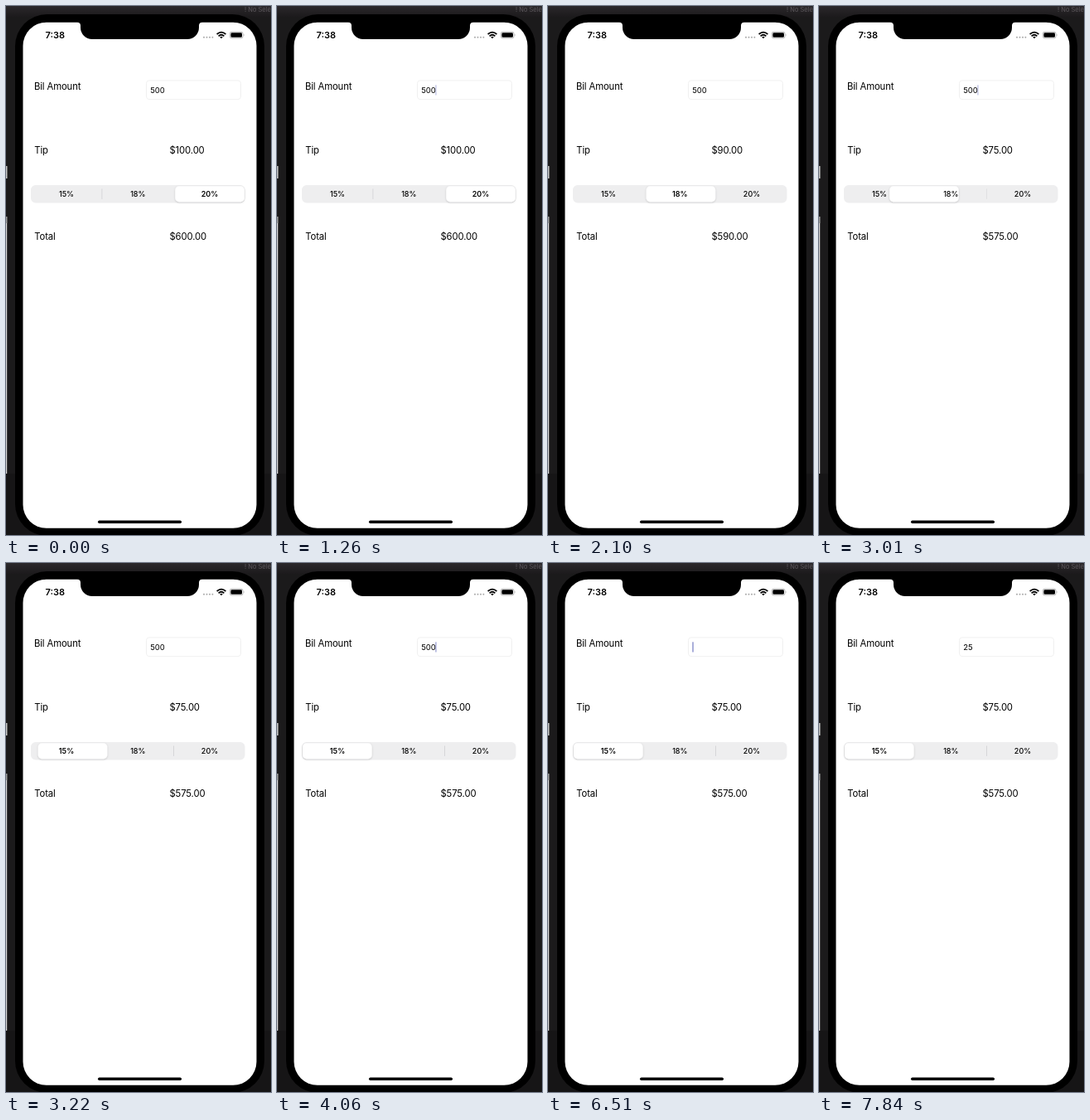
Animation, 320 px wide and 638 px high, one loop 8 s. Source, as an HTML page:

```html
<!DOCTYPE html>
<html lang="en">
<head>
<meta charset="utf-8">
<title>Tip calculator</title>
<style>
  html, body { margin: 0; width: 100%; height: 100%; overflow: hidden; background: #1b1a1b; }
  svg { display: block; width: 100vw; height: 100vh; }
  text { font-family: Inter, "Liberation Sans", sans-serif; fill: #000; white-space: pre; }
  .label { font-size: 11.3px; letter-spacing: -.13px; }
  .field { font-size: 9.5px; }
  .seg { font-size: 9px; font-weight: 500; text-anchor: middle; }
  .seg.on { font-weight: 600; }
  .clock { font-size: 11px; font-weight: 600; text-anchor: middle; }
</style>
</head>
<body>
<svg viewBox="0 0 320 638" preserveAspectRatio="none">
  <defs>
    <linearGradient id="top" x1="0" x2="0" y1="0" y2="1">
      <stop offset="0" stop-color="#2b282b"/>
      <stop offset="1" stop-color="#1c1a1c"/>
    </linearGradient>
    <filter id="lift" x="-10%" y="-30%" width="120%" height="170%">
      <feDropShadow dx="0" dy=".8" stdDeviation=".9" flood-color="#000" flood-opacity=".2"/>
    </filter>
  </defs>

  <!-- desktop behind the phone -->
  <rect width="320" height="638" fill="#1b1a1b"/>
  <rect y="564" width="320" height="74" fill="#161516"/>
  <rect width="320" height="13" fill="url(#top)"/>
  <text x="288" y="6.600" style="font-size:7.500px;fill:#5d585d">! No Selection</text>
  <rect y="193" width="1.500" height="15" fill="#c4c4c4"/>
  <rect y="254" width="1.500" height="8" fill="#9a9a9a"/>
  <rect y="262" width="1.200" height="302" fill="#d6d6d6"/>

  <!-- phone -->
  <rect x="11" y="10" width="301" height="629" rx="38.500" fill="#000"/>
  <path fill="#fff" d="M48.800 19.700H86A4 4 0 0 1 90 23.700V26A14 14 0 0 0 104 40H219A14 14 0 0 0 233 26V23.700
    A4 4 0 0 1 237 19.700H274.200A28.300 28.300 0 0 1 302.500 48V601.500A28.300 28.300 0 0 1 274.200 629.800
    H48.800A28.300 28.300 0 0 1 20.500 601.500V48A28.300 28.300 0 0 1 48.800 19.700Z"/>
  <rect x="111" y="620.500" width="101" height="3.400" rx="1.700"/>

  <!-- status bar -->
  <text class="clock" x="59.300" y="39">7:38</text>
  <g fill="#aaa">
    <circle cx="239" cy="37.700" r="1"/><circle cx="242.500" cy="37.700" r="1"/>
    <circle cx="246" cy="37.700" r="1"/><circle cx="249.400" cy="37.700" r="1"/>
  </g>
  <g fill="none" stroke="#000" stroke-width="1.700">
    <path d="M254.600 34Q260 29.200 265.400 34"/>
    <path d="M256.600 36.300Q260 33.200 263.400 36.300"/>
  </g>
  <path d="M260 39.300L258.200 37.500Q260 36 261.800 37.500Z"/>
  <rect x="270.300" y="31.200" width="15.800" height="7.700" rx="2.300" fill="none" stroke="#999" stroke-width=".7"/>
  <rect x="271.400" y="32.300" width="13.600" height="5.500" rx="1.400"/>
  <path d="M287.100 33.800Q288.400 35 287.100 36.300Z" fill="#999"/>

  <!-- form -->
  <text class="label" x="34" y="101.200">Bil Amount</text>
  <text class="label" x="34.300" y="178.200">Tip</text>
  <text class="label" x="34.300" y="282.200">Total</text>
  <text class="label" id="tip" x="197.500" y="178.200"></text>
  <text class="label" id="total" x="197.500" y="282.200"></text>
  <rect x="169.500" y="89.800" width="114" height="22.800" rx="3.500" fill="#fff" stroke="#ededed" stroke-width=".8"/>
  <text class="field" id="bill" x="174.200" y="104.800"></text>
  <rect id="caret" y="95.300" width="1.400" height="12.200" fill="#4a55b0"/>

  <!-- segmented control -->
  <rect x="30" y="216" width="258.500" height="21.400" rx="5.600" fill="#eeeeef"/>
  <rect id="div1" x="115.500" y="220.500" width=".8" height="12.400" fill="#cfcfd3"/>
  <rect id="div2" x="202" y="220.500" width=".8" height="12.400" fill="#cfcfd3"/>
  <rect id="thumb" y="217.300" width="83.600" height="18.900" rx="4.600" fill="#fff" filter="url(#lift)"/>
  <text class="seg" x="73" y="230">15%</text>
  <text class="seg" x="159.300" y="230">18%</text>
  <text class="seg" x="246" y="230">20%</text>
</svg>
<script>
const LOOP = 8000, TICK = 70;
const homes = [31, 118, 204.3];
const $ = id => document.getElementById(id);
const segs = document.querySelectorAll('.seg');

// [time, entered text, caret x]
const typing = [
  [0, '500', 191.2], [5320, '50', 185.5], [5600, '5', 179.7],
  [5950, '', 174.3], [6790, '2', 179.8], [7140, '25', 185.5]
];
// [time, tip, total]
const sums = [[0, 100, 600], [1540, 90, 590], [2940, 75, 575]];
// [start, steps, final opacity]
const blinks = [
  [0, 1, 0], [210, 2, 1], [840, 3, 0], [1260, 3, 1], [1890, 3, 0], [2310, 3, 1],
  [2940, 3, 0], [3360, 3, 1], [4060, 2, 0], [4410, 3, 1], [5110, 2, 0],
  [5320, 1, 1], [6510, 3, 0], [6790, 1, 1], [7630, 4, 0]
];

const clamp = v => Math.max(0, Math.min(1, v));
const current = (rows, t) => rows.filter(r => r[0] <= t).pop();
const money = n => '$' + n.toFixed(2);

// critically damped spring, 0 to 1
function spring(ms) {
  const w = Math.max(0, ms) * .013;
  return 1 - (1 + w) * Math.exp(-w);
}

function caretAlpha(t) {
  const [start, steps, end] = current(blinks, t);
  const p = clamp((Math.floor((t - start) / TICK) + 1) / steps);
  return end ? p : 1 - p;
}

function draw(t) {
  const [, bill, caretX] = current(typing, t);
  const [, tip, total] = current(sums, t);
  $('bill').textContent = bill;
  $('tip').textContent = money(tip);
  $('total').textContent = money(total);
  $('caret').setAttribute('x', caretX);
  $('caret').setAttribute('opacity', caretAlpha(t));

  const x = homes[2] + (homes[1] - homes[2]) * spring(t - 1560)
                     + (homes[0] - homes[1]) * spring(t - 2909);
  $('thumb').setAttribute('x', x);
  $('div1').setAttribute('opacity', clamp((x - homes[1]) / 40));
  $('div2').setAttribute('opacity', clamp((homes[1] - x) / 60));
  segs.forEach((s, i) => s.classList.toggle('on', Math.abs(x - homes[i]) < 30));
}

const begin = performance.now();
function frame() {
  const t = (performance.now() - begin) % LOOP;
  draw(Math.floor(t / TICK) * TICK);
  requestAnimationFrame(frame);
}
frame();
</script>
</body>
</html>
```
